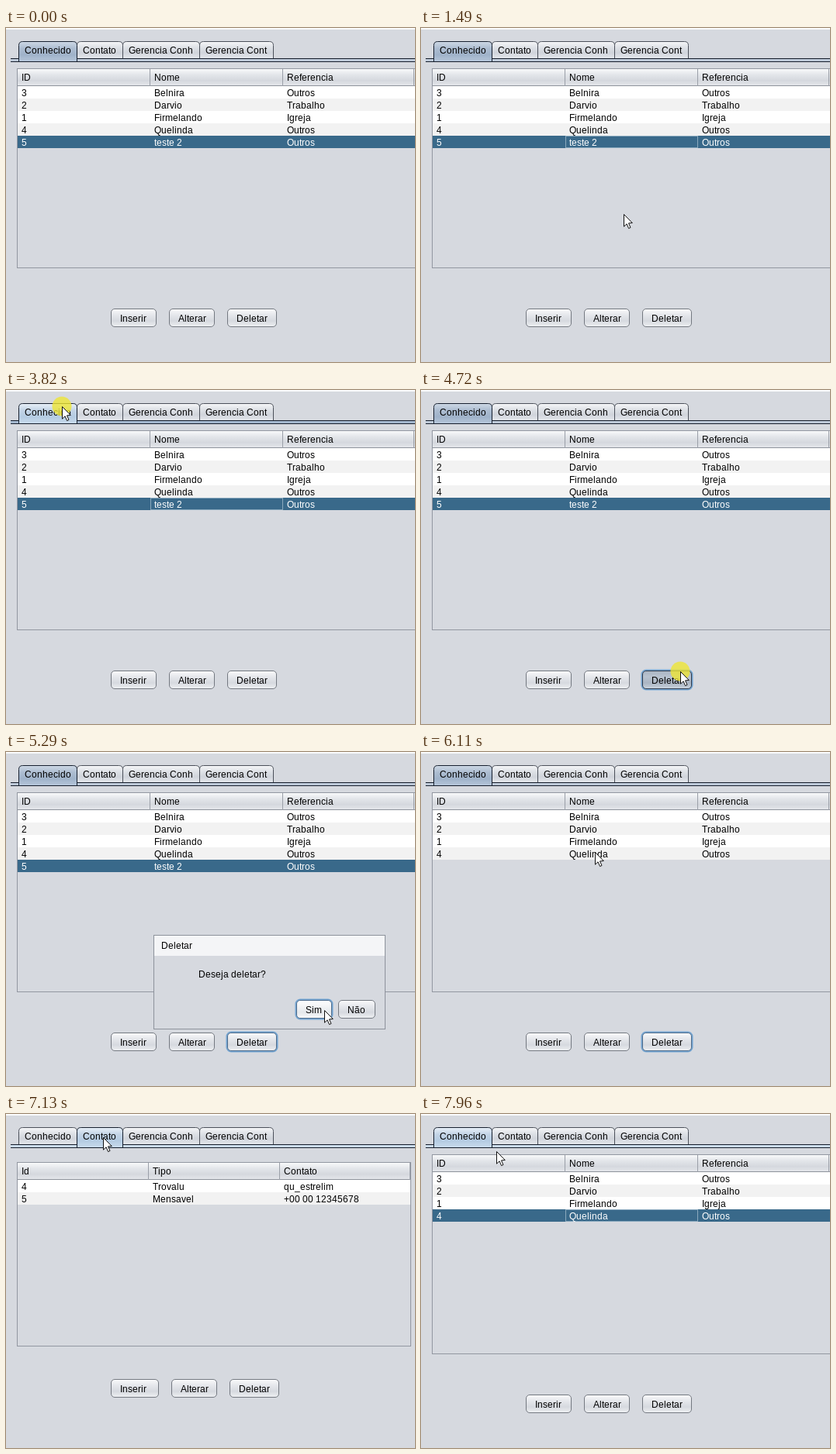
These frames come from a looping animation (527 px wide and 431 px high, 8 s). An HTML page with a canvas:

```html
<!DOCTYPE html>
<html lang="pt">
<head>
<meta charset="utf-8">
<title>Conhecidos</title>
<style>
html, body { margin: 0; width: 100%; height: 100%; overflow: hidden; background: #d6d9df; }
canvas { display: block; }
</style>
</head>
<body>
<canvas id="stage" width="527" height="431"></canvas>
<script>
const ctx = document.getElementById('stage').getContext('2d');
const LOOP = 8000;
const BG = '#d6d9df';
const FONT = "12px 'Liberation Sans', Arial, sans-serif";

// Pointer path: time, x, y
const PATH = [
  [170, 440, 397], [810, 193, 146], [1270, 193, 146], [1490, 261, 240],
  [1930, 303, 355], [2010, 306, 366], [2500, 104, 37], [2710, 104, 37],
  [2830, 100, 30], [3550, 100, 30], [3690, 72, 21], [3970, 72, 21],
  [4600, 334, 363], [4840, 334, 363], [5260, 410, 333], [5520, 410, 333],
  [5990, 247, 149], [6110, 224, 129], [6480, 224, 129], [7010, 125, 30],
  [7310, 125, 30], [7500, 76, 24], [7740, 76, 24], [7920, 89, 38], [7960, 97, 48]
];
const CLICKS = [[1150, 1230], [2910, 3070], [3750, 3830], [4720, 4800],
  [5400, 5480], [6320, 6400], [7050, 7130], [7580, 7660]];

const TABS = [['Conhecido', 16, 76], ['Contato', 91, 60],
  ['Gerencia Conh', 150, 100], ['Gerencia Cont', 249, 96]];

const PEOPLE = {
  x: 14, y: 52, w: 520, h: 258, head: 22, cols: [20, 191, 362], seps: [186, 357, 526],
  titles: ['ID', 'Nome', 'Referencia'],
  rows: [['3', 'Belnira', 'Outros'], ['2', 'Darvio', 'Trabalho'],
    ['1', 'Firmelando', 'Igreja'], ['4', 'Quelinda', 'Outros'], ['5', 'teste 2', 'Outros']],
  buttons: [['Inserir', 135, 362, 59], ['Alterar', 210, 362, 59], ['Deletar', 285, 362, 64]]
};
const CONTACTS = {
  x: 14, y: 62, w: 508, h: 238, head: 22, cols: [20, 189, 358], seps: [184, 353, 521],
  titles: ['Id', 'Tipo', 'Contato'],
  rows: [['4', 'Trovalu', 'qu_estrelim'], ['5', 'Mensavel', '+00 00 12345678']],
  buttons: [['Inserir', 135, 342, 62], ['Alterar', 213, 342, 59], ['Deletar', 288, 342, 64]]
};

const between = (t, a, b) => t >= a && t < b;
const inside = (p, x, y, w, h) => p && between(p.x, x, x + w) && between(p.y, y, y + h);

function rect(x, y, w, h, fill) {
  ctx.fillStyle = fill;
  ctx.fillRect(x, y, w, h);
}

function frame(x, y, w, h, color) {
  ctx.strokeStyle = color;
  ctx.lineWidth = 1;
  ctx.strokeRect(x + .5, y + .5, w - 1, h - 1);
}

function shade(y, h, colors) {
  const g = ctx.createLinearGradient(0, y, 0, y + h);
  colors.forEach((c, i) => g.addColorStop(i / (colors.length - 1), c));
  return g;
}

// Whole-pixel letter advances, as in classic desktop text
function text(str, x, y, color = '#000') {
  ctx.font = FONT;
  ctx.fillStyle = color;
  for (const ch of str) {
    ctx.fillText(ch, x, y);
    x += Math.round(ctx.measureText(ch).width);
  }
}

// Monotone cubic through the path points
function slope(i, axis) {
  const a = PATH[i - 1], b = PATH[i], c = PATH[i + 1];
  if (!a || !c) return 0;
  const d0 = (b[axis] - a[axis]) / (b[0] - a[0]);
  const d1 = (c[axis] - b[axis]) / (c[0] - b[0]);
  return d0 * d1 <= 0 ? 0 : 2 * d0 * d1 / (d0 + d1);
}

function pointer(t) {
  if (t < PATH[0][0]) return null;
  let i = PATH.length - 1;
  while (PATH[i][0] > t) i--;
  const a = PATH[i], b = PATH[i + 1];
  if (!b) return { x: a[1], y: a[2] };
  const span = b[0] - a[0], u = (t - a[0]) / span;
  const at = k => {
    const m0 = slope(i, k) * span, m1 = slope(i + 1, k) * span, d = b[k] - a[k];
    return a[k] + u * (m0 + u * (3 * d - 2 * m0 - m1 + u * (m0 + m1 - 2 * d)));
  };
  return { x: at(1), y: at(2) };
}

function stateAt(t) {
  const dialog = between(t, 4840, 5480);
  return {
    dialog,
    tab: between(t, 2910, 3750) || between(t, 7050, 7580) ? 1 : 0,
    count: t < 5480 ? 5 : 4,
    selected: t < 5480 ? 4 : t >= 6320 ? 3 : -1,
    cell: between(t, 1150, 4720) || t >= 6320,
    focus: between(t, 4720, 6320),
    mouse: pointer(t),
    hover: dialog ? null : pointer(t - 40),
    pressed: CLICKS.some(c => between(t, ...c))
  };
}

function drawTab([label, x, w], selected, hover) {
  const bottom = selected ? 43 : 39;
  const colors = selected
    ? hover ? ['#e6eef7', '#c3d4e6', '#b4cbe2', '#c9dbec'] : ['#ccd7e4', '#adbdd1', '#9fb2c9', '#b5c6da']
    : hover ? ['#ffffff', '#f1f3f6', '#e4e8ed', '#f8fafc'] : ['#f4f5f7', '#dfe2e7', '#d0d4db', '#e4e7ec'];
  ctx.beginPath();
  ctx.moveTo(x + .5, bottom);
  ctx.lineTo(x + .5, 22.5);
  ctx.quadraticCurveTo(x + .5, 17.5, x + 5.5, 17.5);
  ctx.lineTo(x + w - 5.5, 17.5);
  ctx.quadraticCurveTo(x + w - .5, 17.5, x + w - .5, 22.5);
  ctx.lineTo(x + w - .5, bottom);
  ctx.fillStyle = shade(18, bottom - 18, colors);
  ctx.fill();
  ctx.strokeStyle = selected ? '#17202f' : '#4b505a';
  ctx.lineWidth = 1;
  ctx.stroke();
  text(label, x + 8, 33);
}

function drawTabs(s) {
  const over = inside(s.hover, 6, 17, 521, 26);
  rect(6, 39, 521, 1, '#151d2b');
  rect(6, 40, 521, 3, over ? s.pressed ? '#a3b7ce' : '#cbdbea' : '#bdc9d8');
  rect(6, 43, 521, 1, '#151d2b');
  const draw = i => drawTab(TABS[i], i === s.tab, inside(s.hover, TABS[i][1], 17, TABS[i][2], 25));
  TABS.forEach((_, i) => { if (i !== s.tab) draw(i); });
  draw(s.tab);
}

function drawButton([label, x, y, w], hover, focus, pressed) {
  const box = (grow, r) => {
    ctx.beginPath();
    ctx.roundRect(x + .5 - grow, y + .5 - grow, w - 1 + 2 * grow, 23 + 2 * grow, r);
  };
  if (focus) {
    box(1, 5.5);
    ctx.strokeStyle = '#73a4d1';
    ctx.lineWidth = 2;
    ctx.stroke();
  }
  box(0, 4.5);
  ctx.fillStyle = shade(y, 24, pressed ? ['#a9b3c1', '#b9c3d0', '#aab5c3', '#ccd5df']
    : hover ? ['#ffffff', '#f3f4f6', '#e5e8ec', '#fafbfc']
    : ['#fbfbfc', '#e6e8ec', '#d6d9df', '#f0f2f4']);
  ctx.fill();
  ctx.strokeStyle = pressed ? '#2f3b4d' : focus ? '#506d8c' : '#747981';
  ctx.lineWidth = 1;
  ctx.stroke();
  text(label, x + 12, y + 17);
}

function drawTable(tb, count, selected, cell) {
  const top = tb.y + 1;
  rect(tb.x + 1, top, tb.w - 2, tb.head, shade(top, tb.head, ['#f8f9fa', '#e3e6ea', '#d5d8de', '#e6e8ec']));
  rect(tb.x + 1, top + tb.head - 1, tb.w - 2, 1, '#8d929b');
  tb.seps.forEach(x => rect(x - 1, top, 1, tb.head, '#9a9fa8'));
  tb.titles.forEach((title, i) => text(title, tb.cols[i], top + 15));
  tb.rows.slice(0, count).forEach((row, i) => {
    const y = top + tb.head + 16 * i, on = i === selected;
    rect(tb.x + 1, y, tb.w - 2, 16, on ? '#39698a' : i % 2 ? '#f2f2f2' : '#ffffff');
    if (on && cell) frame(tb.seps[0], y, tb.seps[1] - tb.seps[0], 16, '#8aa9be');
    row.forEach((value, c) => text(value, tb.cols[c], y + 13, on ? '#fff' : '#000'));
  });
  frame(tb.x, tb.y, tb.w, tb.h, '#9297a1');
}

function drawDialog(s) {
  rect(190, 236, 299, 122, BG);
  rect(190, 236, 299, 27, '#f4f5f7');
  frame(190, 236, 299, 122, '#8d929b');
  text('Deletar', 200, 254);
  text('Deseja deletar?', 248, 291);
  drawButton(['Sim', 374, 320, 46], inside(s.mouse, 374, 320, 46, 24), true, s.pressed);
  drawButton(['Não', 428, 320, 48]);
}

function drawPointer({ x, y }, pressed) {
  ctx.save();
  ctx.translate(Math.round(x), Math.round(y));
  if (pressed) {
    ctx.beginPath();
    ctx.arc(0, 0, 12.5, 0, Math.PI * 2);
    ctx.fillStyle = 'rgba(238, 230, 50, .78)';
    ctx.fill();
  }
  ctx.beginPath();
  [[.5, .5], [.5, 16.2], [4.1, 12.8], [6.6, 18.6], [9, 17.5], [6.5, 11.9], [11.3, 11.5]]
    .forEach(p => ctx.lineTo(...p));
  ctx.closePath();
  ctx.fillStyle = '#fff';
  ctx.fill();
  ctx.strokeStyle = '#111';
  ctx.lineWidth = 1;
  ctx.stroke();
  ctx.restore();
}

function draw(t) {
  const s = stateAt(t);
  rect(0, 0, 527, 431, BG);
  rect(0, 0, 527, 2, '#fafbfc');
  drawTabs(s);
  const pane = s.tab ? CONTACTS : PEOPLE;
  // The contact list belongs to the chosen person
  if (s.tab) drawTable(pane, t < 5480 ? 0 : 2, -1, false);
  else drawTable(pane, s.count, s.selected, s.cell);
  pane.buttons.forEach((b, i) => {
    const hover = inside(s.hover, b[1], b[2], b[3], 24);
    drawButton(b, hover, i === 2 && s.focus, hover && s.pressed);
  });
  if (s.dialog) drawDialog(s);
  if (s.mouse) drawPointer(s.mouse, s.pressed);
}

function tick() {
  draw(performance.now() % LOOP);
  requestAnimationFrame(tick);
}
tick();
</script>
</body>
</html>
```
